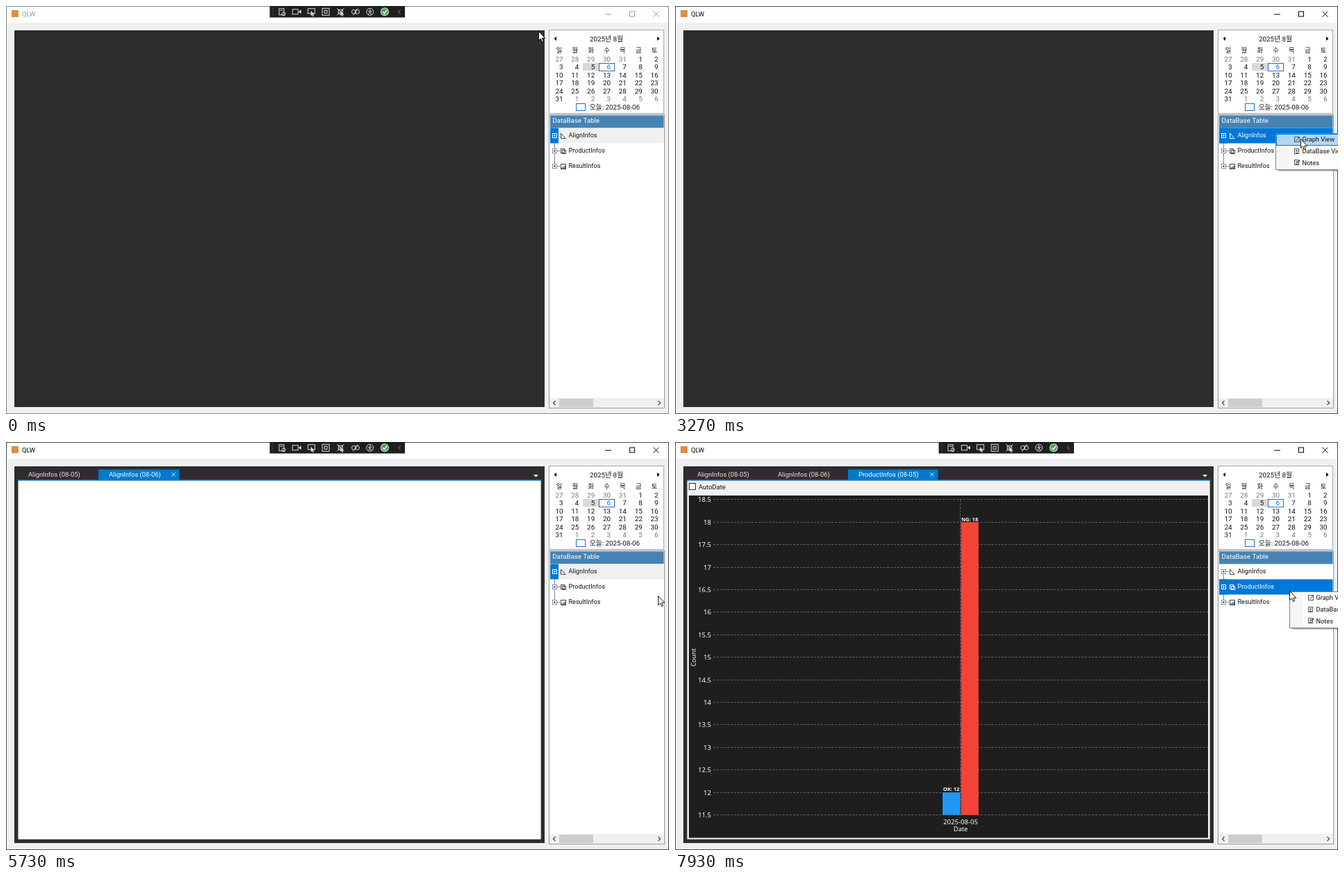
Write an HTML page with a canvas that moves like this. It is 954 px wide and 587 px high and loops after 8000 ms.

```html
<!DOCTYPE html>
<html lang="ko">
<head>
<meta charset="utf-8">
<title>QLW</title>
<style>
html, body { margin: 0; width: 100%; height: 100%; overflow: hidden; background: #f0f0f0; }
canvas { display: block; }
</style>
</head>
<body>
<canvas id="stage" width="954" height="587"></canvas>
<script>
const ctx = document.getElementById('stage').getContext('2d');
const LOOP = 8000, TICK = 1000 / 15;
const UI = 'Roboto, "Noto Sans CJK KR", "Noto Sans CJK", sans-serif';
const PLOT = '"Noto Sans", sans-serif';
const BLUE = '#0078d7', TAB_BLUE = '#007acc', INK = '#111', FACE = '#f0f0f0';
const ROW = 22, ITEM = 16.7;

const START = [766, 36];
const MOVES = [
  { from: 0, to: 730, x: 843, y: 92 },
  { from: 1400, to: 2070, x: 875, y: 173 },
  { from: 2070, to: 2400, x: 864, y: 182 },
  { from: 2670, to: 3200, x: 900, y: 191 },
  { from: 4200, to: 4400, x: 895, y: 193 },
  { from: 4800, to: 5000, x: 938, y: 221 },
  { from: 6000, to: 6470, x: 884, y: 212 },
  { from: 6600, to: 6870, x: 904, y: 222 },
  { from: 7400, to: 7800, x: 884, y: 214 }
];
const MENUS = [
  { open: 2670, close: 3400 },
  { open: 4670, close: 5330 },
  { open: 6600, close: 7000 },
  { open: 7930, close: LOOP }
];
const TABS = [
  { at: 3400, name: 'AlignInfos (08-05)', width: 116 },
  { at: 5730, name: 'AlignInfos (08-06)', width: 116 },
  { at: 7200, name: 'ProductInfos (08-05)', width: 129 }
];

const during = (t, a, b) => t >= a && t < b;
const smooth = u => u * u * (3 - 2 * u);
const clamp = u => Math.min(1, Math.max(0, u));

function rect(x, y, w, h, color) {
  ctx.fillStyle = color;
  ctx.fillRect(x, y, w, h);
}

function frame(x, y, w, h, color) {
  ctx.strokeStyle = color;
  ctx.lineWidth = 1;
  ctx.strokeRect(x + .5, y + .5, w - 1, h - 1);
}

function trace(points) {
  ctx.beginPath();
  for (let i = 0; i < points.length; i += 2) ctx.lineTo(points[i], points[i + 1]);
}

function line(color, width, ...points) {
  ctx.strokeStyle = color;
  ctx.lineWidth = width;
  trace(points);
  ctx.stroke();
}

function poly(color, ...points) {
  ctx.fillStyle = color;
  trace(points);
  ctx.fill();
}

function disc(x, y, r, color, filled) {
  ctx.beginPath();
  ctx.arc(x, y, r, 0, 7);
  ctx.fillStyle = ctx.strokeStyle = color;
  ctx.lineWidth = 1;
  if (filled) ctx.fill(); else ctx.stroke();
}

function text(s, x, mid, color, size, align = 'left', family = UI, weight = '') {
  ctx.font = `${weight} ${size}px ${family}`;
  ctx.textAlign = align;
  ctx.fillStyle = color;
  ctx.fillText(s, x, mid + size * .36);
}

function cross(x, y, r, color) {
  line(color, 1, x - r, y - r, x + r, y + r);
  line(color, 1, x - r, y + r, x + r, y - r);
}

function chevron(x, y, dir, color) {
  line(color, 1.2, x - dir * 1.5, y - 3, x + dir * 1.5, y, x - dir * 1.5, y + 3);
}

// Draws with the origin moved to (x, y)
function at(x, y, paint, scale = 1) {
  ctx.save();
  ctx.translate(x, y);
  ctx.scale(scale, scale);
  paint();
  ctx.restore();
}

function arrow(fill, edge) {
  trace([0, 0, 0, 13, 3, 10.4, 5, 15, 7, 14.2, 5, 9.8, 9.2, 9.8]);
  ctx.closePath();
  ctx.fillStyle = fill;
  ctx.fill();
  ctx.strokeStyle = edge;
  ctx.lineWidth = .9;
  ctx.stroke();
}

function pointerAt(t) {
  let [x, y] = START;
  for (const m of MOVES) {
    const e = smooth(clamp((t - m.from) / (m.to - m.from)));
    x += (m.x - x) * e;
    y += (m.y - y) * e;
  }
  return [Math.round(x), Math.round(y)];
}

// A right click gives the tree the focus, a new tab takes it away
function treeFocused(t) {
  const last = times => Math.max(0, ...times.filter(v => v <= t));
  return last(MENUS.map(m => m.open - 70)) > last(TABS.map(tab => tab.at));
}

function drawWindow(active) {
  const ink = active ? '#000' : '#999';
  rect(0, 0, 954, 587, FACE);
  rect(0, 0, 954, 24, '#fff');
  frame(0, 0, 954, 587, active ? '#4a4a4e' : '#85858a');
  rect(8, 6, 10, 10, '#d9913f');
  text('QLW', 23, 12, ink, 9.4);
  line(ink, 1, 862, 12, 871, 12);
  frame(897, 7.5, 8, 8, ink);
  cross(935.5, 11.7, 4, ink);
}

function drawToolbar() {
  const c = '#dcdcdc', box = r => frame(-r, -r, 2 * r, 2 * r, c);
  const pick = () => at(0, -1, () => arrow(c, c), .5);
  const icons = [
    () => { frame(-4, -5, 8, 10, c); disc(3, 3, 2.5, c); line(c, 1, -2, -2, 2, -2); },
    () => { frame(-6, -4, 9, 8, c); poly(c, 3, 0, 7, -3, 7, 3); },
    () => { frame(-5, -5, 11, 8, c); pick(); },
    () => { box(5.5); box(2.5); },
    () => { box(3.5); cross(0, 0, 5, c); pick(); },
    () => { disc(-2, 0, 3, c); disc(3, 0, 3, c); line(c, 1, -3, 5, 4, -5); },
    () => { disc(0, 0, 5, c); disc(0, -2.5, 1, c, true); line(c, 1, -3, -.5, 3, -.5); line(c, 1, -2, 4, 0, 0, 2, 4); },
    () => { disc(0, 0, 6, '#e4f2e2', true); disc(0, 0, 5, '#4f9f58', true); line('#fff', 1.5, -2.5, 0, -.5, 2.5, 3, -2.5); },
    () => chevron(0, 0, -1, '#666')
  ];
  rect(379.5, 0, 194.5, 16.5, '#1f1f1f');
  for (let y = 3; y < 14; y += 3) rect(383, y, 2, 1, '#4a4a4a');
  icons.forEach((paint, i) => at(396.5 + 21.2 * i, 8.3, paint));
}

function drawCalendar(hover) {
  const col = i => 801.5 + i * 22.85;
  rect(781, 34, 166, 121, '#fff');
  frame(781, 34, 166, 121, '#a8a8a8');
  poly('#000', 792, 44, 792, 50, 788.5, 47);
  poly('#000', 937, 44, 937, 50, 940.5, 47);
  text('2025년 8월', 864, 47.5, INK, 9.8, 'center');
  [...'일월화수목금토'].forEach((d, i) => text(d, col(i) - 5.5, 64, INK, 9.4, 'center'));
  rect(830, 82, 23, 11, hover ? '#cbe8f2' : '#d9d9d9');
  if (hover) frame(830, 82, 23, 12, '#4590ac');
  frame(853, 82, 23, 12, '#1c6fd0');
  const first = new Date(2025, 6, 27);
  for (let n = 0; n < 42; n++) {
    const date = new Date(2025, 6, first.getDate() + n), day = date.getDate();
    const color = date.getMonth() !== 7 ? '#777' : day === 6 ? '#1c6fd0' : INK;
    text(day, col(n % 7), 76.5 + Math.floor(n / 7) * 11.4, color, 9.9, 'right');
  }
  frame(820, 140, 14, 11, '#1c6fd0');
  text('오늘: 2025-08-06', 912, 145.5, INK, 9.8, 'right');
}

function treeIcon(i, c) {
  if (i === 0) {
    line(c, 1, .5, -4, .5, 3.5, 7, 3.5, .5, -4);
  } else if (i === 1) {
    frame(0, -4, 6, 7, c);
    frame(2, -2, 6, 6, c);
  } else {
    frame(0, -4, 8, 8, c);
    for (let k = 0; k < 3; k++) rect(1.5 + k * 2, 1 - k, 1.5, 2 + k, '#2b6cb0');
  }
}

function drawTree(selected, focused) {
  rect(781, 156, 167, 423, '#fff');
  frame(781, 156, 167, 423, '#9a9a9a');
  rect(783, 157.5, 163.5, 18, '#4682b4');
  text('DataBase Table', 786.5, 164.5, '#fff', 9.7);
  line('#8080a8', 1, 789.5, 186, 789.5, 186 + 2 * ROW);
  const top = 175.5 + selected * ROW;
  rect(783, top, 163.5, ROW, focused ? BLUE : FACE);
  rect(783, top, 12, ROW, BLUE);
  ['AlignInfos', 'ProductInfos', 'ResultInfos'].forEach((name, i) => {
    const y = 186 + i * ROW, sel = i === selected, lit = sel && focused;
    const mark = sel ? '#fff' : '#3a4a8c';
    if (!sel) line('#8080a8', 1, 793, y + .5, 797, y + .5);
    rect(786, y - 3, 7, 7, sel ? BLUE : '#fff');
    frame(786, y - 3, 7, 7, sel ? '#fff' : '#8c8c8c');
    rect(788, y, 3, 1, mark);
    rect(789, y - 1, 1, 3, mark);
    at(798, y + 1, () => treeIcon(i, lit ? '#fff' : '#444'));
    text(name, 809.5, y, lit ? '#fff' : INK, 9.1);
  });
  rect(782, 564, 165, 14, FACE);
  rect(796, 565, 49, 12, '#cdcdcd');
  chevron(789, 571, -1, '#444');
  chevron(940, 571, 1, '#444');
}

function drawTabs(tabs) {
  let x = 17;
  tabs.forEach((tab, i) => {
    const on = i === tabs.length - 1;
    if (on) rect(x, 39.5, tab.width + .5, 15, TAB_BLUE);
    text(tab.name, x + 15, 47, on ? '#fff' : '#e6e6e6', 9.4);
    if (on) cross(x + tab.width - 8, 46.7, 2.8, '#d6ebfa');
    x += tab.width;
  });
  rect(17, 54, 753, 1.6, TAB_BLUE);
  poly('#fff', 759, 47, 766, 47, 762.5, 50.5);
}

function drawPage(color) {
  rect(17.5, 55.6, 752.2, 516, color);
}

function drawAutoDate() {
  drawPage(FACE);
  rect(20, 59, 10, 10, '#fff');
  frame(20, 59, 10, 10, '#333');
  text('AutoDate', 34, 64.5, INK, 9.4);
}

function drawPanels() {
  drawAutoDate();
  rect(20, 81, 747, 488.5, '#1e1e1e');
  for (const y of [238.5, 401]) rect(20, y, 747, 4, FACE);
}

function drawBars() {
  const low = 11.5, high = 18.5, base = 536.5;
  const yOf = v => base - (v - low) * 64.79;
  drawAutoDate();
  rect(20, 77, 747, 492.5, '#1e1e1e');
  ctx.setLineDash([3, 2]);
  for (let v = low; v <= high; v += .5) {
    const y = Math.floor(yOf(v)) + .5;
    line('#626262', 1, 55, y, 767, y);
    text(v, 52, y, '#fff', 9.6, 'right', PLOT);
  }
  line('#626262', 1, 410.5, yOf(high), 410.5, base);
  ctx.setLineDash([]);
  const bar = (x, v, color, label) => {
    rect(x, yOf(v), 25.3, base - yOf(v), color);
    text(`${label}: ${v}`, x + 12.6, yOf(v) - 4.5, '#fff', 7.5, 'center', PLOT, 'bold');
  };
  bar(385, 12, '#2196f3', 'OK');
  bar(411.5, 18, '#f44336', 'NG');
  text('2025-08-05', 411, 546.5, '#fff', 9.6, 'center', PLOT);
  text('Date', 411, 556.5, '#fff', 9.2, 'center', PLOT);
  at(27, 310, () => {
    ctx.rotate(-Math.PI / 2);
    text('Count', 0, 0, '#fff', 9.2, 'center', PLOT);
  });
}

function drawDock(t) {
  const tabs = TABS.filter(tab => t >= tab.at);
  rect(12, 35, 763, 542, '#2d2d30');
  if (!tabs.length) return;
  drawTabs(tabs);
  if (tabs.length === 3) drawBars();
  else if (tabs.length === 1 && t >= 3600) drawPanels();
  else {
    drawPage('#fff');
    if (t >= 5800) rect(20, 72, 748, 5, FACE);
  }
}

function drawMenu(x, y, [px, py]) {
  const hot = px > x ? Math.floor((py - y - 1.5) / ITEM) : -1;
  for (const h of [50, 51]) rect(x + 4, y + 4, 150, h, 'rgba(0,0,0,.18)');
  rect(x, y, 150, 53, '#fdfdfd');
  rect(x + 1, y + 1, 18, 51, '#f5f5f5');
  frame(x, y, 150, 53, '#808080');
  ['Graph View', 'DataBase View', 'Notes'].forEach((name, i) => {
    const mid = y + 9 + i * ITEM, top = Math.round(mid) - 4;
    if (i === hot) {
      rect(x + 1, top - 4, 148, 17, '#b3d7f3');
      frame(x + 1, top - 4, 148, 17, BLUE);
    }
    at(x + 27, top, () => {
      frame(0, 0, i ? 7 : 8, 8, '#555');
      if (i === 0) line('#444', 1, 2, 4, 3.5, 5.5, 7, 1);
      else for (let k = 2; k < 7; k += 2) rect(2, k, 3, 1, '#555');
      if (i === 2) line('#444', 1.2, 4, 5, 8, 1);
    });
    text(name, x + 38.5, mid, INK, 9.2);
  });
}

function draw(t) {
  const pointer = pointerAt(t);
  drawWindow(t >= 1470);
  drawDock(t);
  drawCalendar(during(t, 600, 2600));
  drawTree(t >= 6530 ? 1 : 0, treeFocused(t));
  if (!during(t, 2670, 3670)) drawToolbar();
  const menu = MENUS.find(m => during(t, m.open, m.close));
  if (menu) {
    const [x, y] = pointerAt(menu.open);
    drawMenu(x, y + 1, pointer);
  }
  at(pointer[0] + .5, pointer[1] + .5, () => arrow('#fff', '#000'));
}

function loop() {
  const t = performance.now() % LOOP;
  const step = Math.floor((t + 4) / TICK) % 120;
  draw(Math.round(step * TICK / 10) * 10);
  requestAnimationFrame(loop);
}
loop();
</script>
</body>
</html>
```
